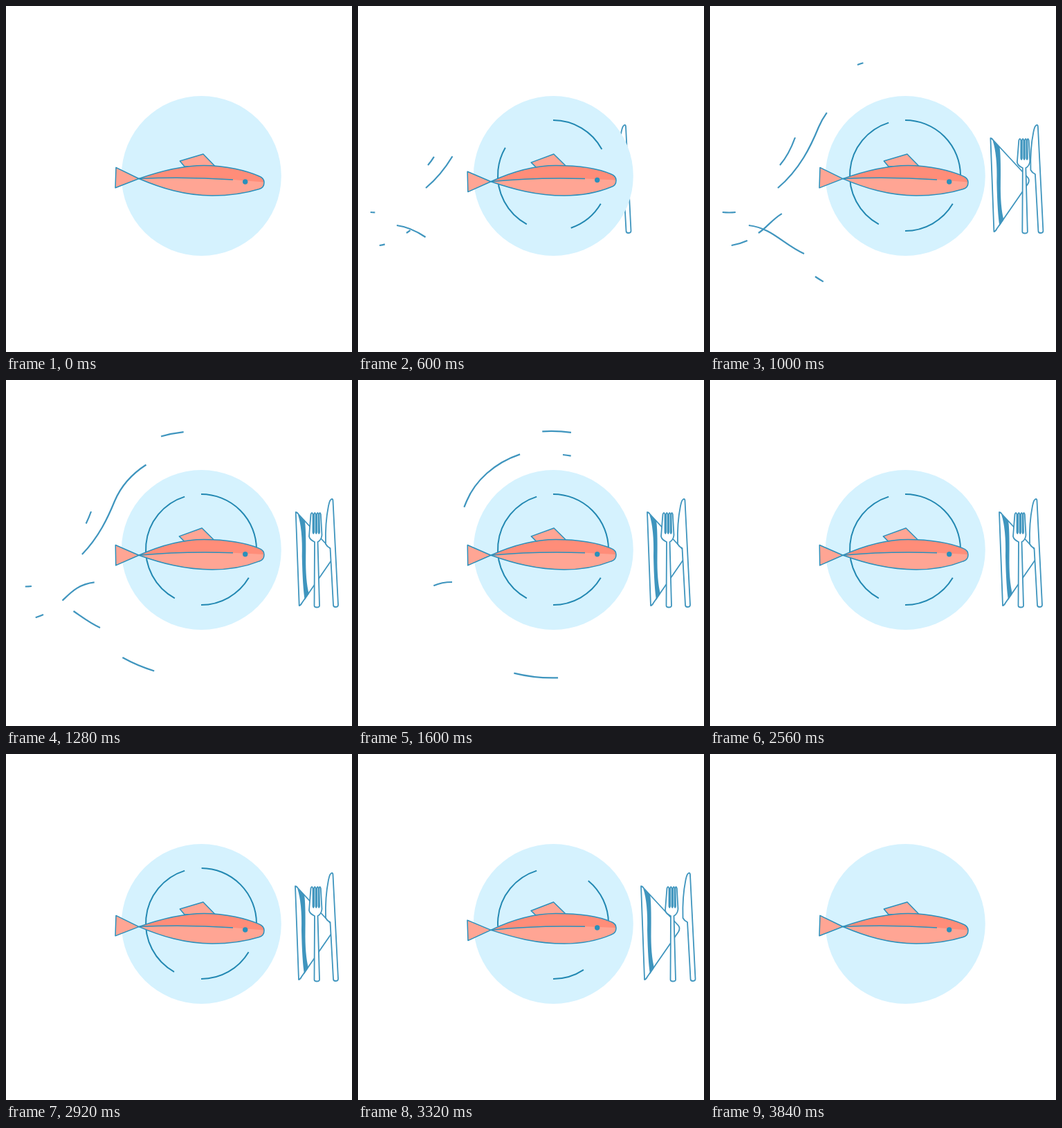
These frames come from a looping animation (500x500 px, 3880 ms). An HTML page:

```html
<!DOCTYPE html>
<html lang="en">
<head>
<meta charset="utf-8">
<title>Fish on a plate</title>
<style>
  html, body { margin: 0; width: 100%; height: 100%; overflow: hidden; background: #fff; }
  svg { display: block; width: 100vw; height: 100vh; }
  #swooshes { fill: none; stroke: #3f95be; stroke-width: 2.2; }
  #cutlery { fill: #fff; stroke: #3f95be; stroke-width: 1.8; stroke-linejoin: round; }
  #rim { fill: none; stroke: #2288b2; stroke-width: 2; }
  #fish { fill: #ffa594; stroke: #2b90bb; stroke-width: 1.5; stroke-linejoin: round; }
</style>
</head>
<body>
<svg viewBox="0 0 500 500">
  <g id="swooshes"></g>
  <g id="cutlery">
    <g id="napkin">
      <path d="M418 191L423 326Q425 326 427 322L472 257Q475 252 472 248L422 194Q420 191 418 191Z"/>
      <path fill="#3f95be" stroke="none" d="M421 194Q428 215 427 255Q428 300 431 318L437 309Q432 290 432.500 255Q433 215 431 203Z"/>
    </g>
    <path id="knife" d="M471 172Q468 172 466 182Q461 207 462 237Q464 241 468.500 243L473 325Q473 328 476 328Q480 328 480 325L472.500 175Q472.500 172 471 172Z"/>
    <path id="fork" d="M440.500 194Q442 190 443.500 194L443.500 220Q444.300 224 445 220L445 194Q446.300 190 447.500 194L447.500 220Q448.300 224 449 220L449 194Q450.300 190 451.500 194L451.500 220Q452.300 224 453 220L452.500 194Q453.500 190 454.800 194L456.500 224Q456 231 450.500 234L453 326Q453 328.500 449 328.500Q445.500 328.500 445.500 326L446 234Q439 231 438 226Z"/>
  </g>
  <circle cx="282.300" cy="245.500" r="115.500" fill="#d5f2fe"/>
  <g id="rim"></g>
  <g id="fish">
    <path id="fin"/>
    <path id="tail"/>
    <path id="body" stroke="none"/>
    <path id="back" fill="#ff8d79" stroke="none"/>
    <path id="outline" fill="none"/>
    <path id="midline" fill="none"/>
    <circle id="eye" cx="345.700" r="3.700" fill="#2b90bb" stroke="none"/>
  </g>
</svg>
<script>
const LOOP = 3880, STEP = 40, CYCLE = 960, END = 4 * CYCLE;
const $ = id => document.getElementById(id);
const smooth = x => (x = Math.min(1, Math.max(0, x)), x * x * (3 - 2 * x));
const ramp = (t, start, length) => smooth((t - start) / length);
const frontLoaded = (t, start, length) => {
  const x = Math.min(1, Math.max(0, (t - start) / length));
  return smooth(x * (1.3 - 0.3 * x));
};

function addLine(parent, d) {
  const path = document.createElementNS('http://www.w3.org/2000/svg', 'path');
  path.setAttribute('d', d);
  path.setAttribute('pathLength', 1);
  return $(parent).appendChild(path);
}

function trim(path, from, to) {
  path.style.display = to - from > 0.001 ? '' : 'none';
  path.setAttribute('stroke-dasharray', `${Math.max(0, to - from)} 2`);
  path.setAttribute('stroke-dashoffset', -from);
}

// Plate rim: start and end angle of each arc, clockwise.
const rim = [[-90, 0], [30.7, 90], [118.5, 252.7]].map(angles => {
  const [a, b] = angles.map(deg => {
    const r = deg * Math.PI / 180;
    return `${282 + 80 * Math.cos(r)} ${245 + 80 * Math.sin(r)}`;
  });
  return addLine('rim', `M${a}A80 80 0 0 1 ${b}`);
});

// Path, then start and length of the head's and the tail's run.
const swooshes = [
  ['M213 85A205 205 0 0 1 383 102', 815, 1720, 1045, 1500, frontLoaded],
  ['M152 391A232 232 0 0 0 383 407', 815, 1600, 1020, 1500, frontLoaded],
  ['M98 263C130 236 146 202 157 175C170 144 200 117 240 105.500', -20, 1800, 1100, 1080],
  ['M101 230Q114 215 123 190', 350, 650, 1000, 500],
  ['M18 298Q28 299 37 298', 350, 650, 1000, 560],
  ['M31 346Q43 344 54 339', 350, 650, 1000, 560],
  ['M56 317C90 321 105 344 136 358', 200, 800, 1000, 560],
  ['M70 328C88 317 98 292 136 292', 400, 1100, 1000, 1000],
  ['M296 108A140 140 0 0 1 380 146', 1500, 450, 1640, 500]
].map(([d, ...timing]) => [addLine('swooshes', d), ...timing]);

// Slides out from behind the plate, overshoots, and later winds up to slide back.
function slide(id, t, enter, leave) {
  const settle = Math.min(1, Math.max(0, (t - enter - 420) / 340));
  const x = -130 + 137 * ramp(t, enter, 420) - 7 * (1 - (1 - settle) ** 3)
    + 8 * ramp(t, leave - 200, 200) - 138 * ramp(t, leave, 420);
  $(id).setAttribute('transform', `translate(${x} 0)`);
}

function drawFish(w) {
  const set = (id, d) => $(id).setAttribute('d', d);
  const mix = (a, b) => a + (b - a) * w;
  const joint = `192 ${mix(249.5, 254.5)}`;
  const nose = y => y - 3.5 * w;
  const top = `M${joint}C222 ${mix(239, 240)} 255 230.500 286 230.500C318 230.500 348 ${nose(238)} 366 ${nose(246)}`;
  const body = `${top}C371 ${nose(248)} 373 ${nose(251)} 373 ${nose(255)}C373 ${nose(260)} 371 ${nose(263)} 366 ${nose(264.5)}C345 ${mix(271, 270)} 322 274 298 274C258 274 224 ${mix(263, 265)} ${joint}Z`;
  const bend = `${mix(260, 255)} ${mix(246.5, 247.5)}`;
  const midEnd = `328 ${mix(251, 249.2)}`;
  set('body', body);
  set('outline', body);
  set('back', `${top}C371 ${nose(248)} 373 ${nose(251)} 372.500 ${nose(254.5)}L${midEnd}Q${bend} ${joint}Z`);
  set('midline', `M${joint}Q${bend} ${midEnd}`);
  set('fin', `M258 ${mix(232, 234)}L${mix(251.3, 250)} ${mix(224, 226.5)}L${mix(285, 282.5)} 214L${mix(302, 300.5)} 231.500Z`);
  set('tail', `M${mix(159, 158)} ${mix(233.3, 240.3)}L${mix(158, 159)} ${mix(262.7, 269.7)}L${joint}Z`);
  $('eye').setAttribute('cy', mix(254, 251));
}

function render() {
  const t = Math.min(END, Math.floor(performance.now() % LOOP / STEP) * STEP);
  const phase = t % CYCLE / (CYCLE / 2);
  drawFish(smooth(phase < 1 ? phase : 2 - phase));
  for (const arc of rim) trim(arc, ramp(t, END - CYCLE, CYCLE), ramp(t, 0, CYCLE));
  for (const [path, headStart, headLength, tailStart, tailLength, ease = ramp] of swooshes)
    trim(path, ramp(t, tailStart, tailLength), t ? ease(t, headStart, headLength) : 0);
  slide('knife', t, 440, 3350);
  slide('fork', t, 560, 3290);
  slide('napkin', t, 680, 3228);
  requestAnimationFrame(render);
}
render();
</script>
</body>
</html>
```
